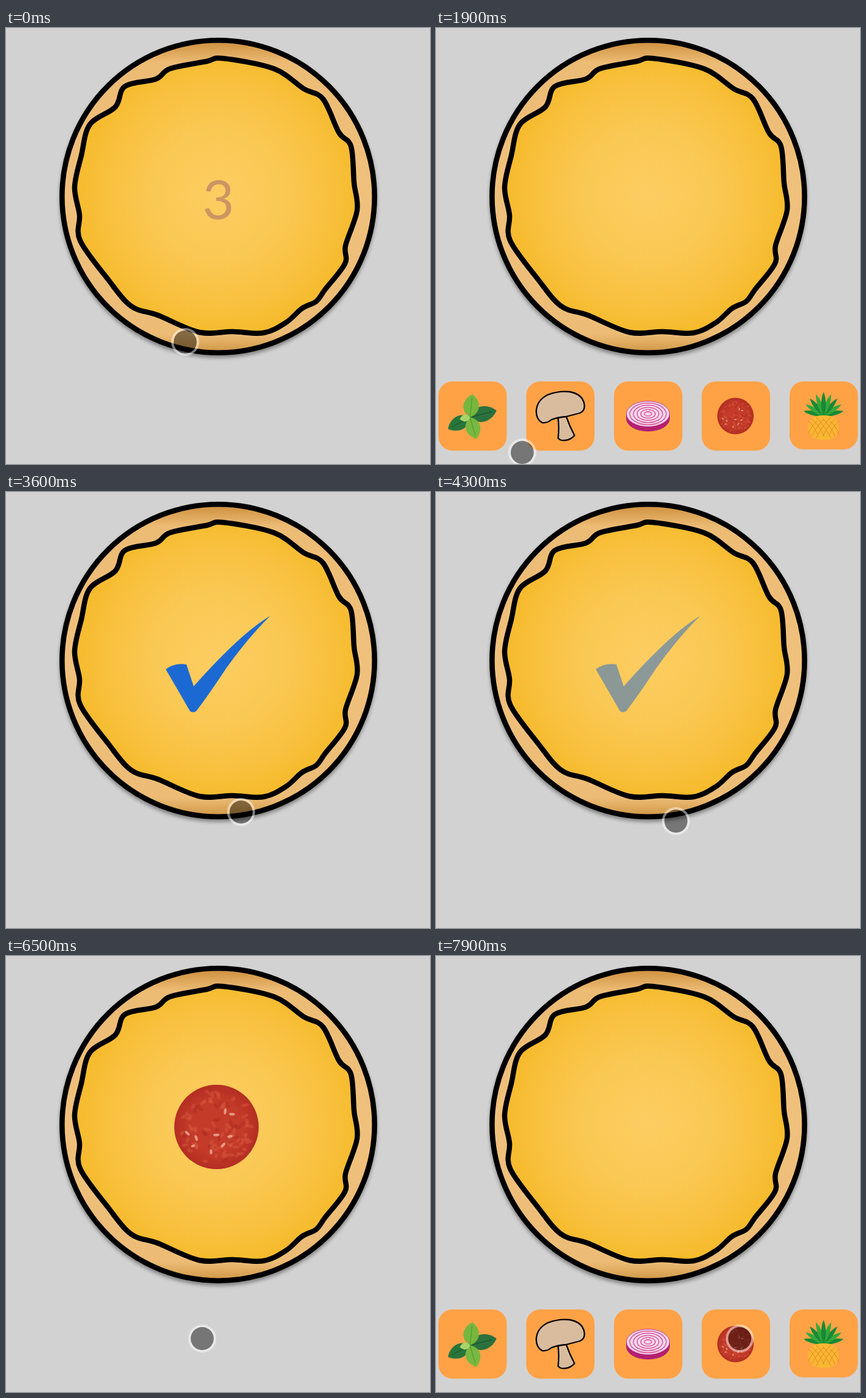
An HTML page for the animation above (8 s loop, 698x718 px).

```html
<!DOCTYPE html>
<html lang="en">
<head>
<meta charset="utf-8">
<title>Pizza memory game</title>
<style>
  html, body { margin: 0; width: 100%; height: 100%; overflow: hidden; background: #d2d2d2; }
  svg { display: block; width: 100%; height: 100%; }
  #count { font: 400 90px Lato, sans-serif; fill: #cc9563; text-anchor: middle; }
  .outline { stroke: #000; stroke-linejoin: round; stroke-linecap: round; }
</style>
</head>
<body>
<svg viewBox="0 0 698 718" xmlns="http://www.w3.org/2000/svg">
  <defs>
    <linearGradient id="dough" x2="0" y2="1">
      <stop offset="0" stop-color="#cc8d3a"/>
      <stop offset=".07" stop-color="#ecbb74"/>
      <stop offset=".5" stop-color="#f0c17d"/>
      <stop offset=".94" stop-color="#ecbc76"/>
      <stop offset="1" stop-color="#cf9645"/>
    </linearGradient>
    <radialGradient id="cheeseFill" gradientUnits="userSpaceOnUse" cx="349" cy="274" r="238">
      <stop offset="0" stop-color="#fdcd62"/>
      <stop offset=".45" stop-color="#fac853"/>
      <stop offset=".75" stop-color="#f8c140"/>
      <stop offset="1" stop-color="#f6ba2b"/>
    </radialGradient>
    <radialGradient id="meat">
      <stop offset=".6" stop-color="#c43b29"/>
      <stop offset="1" stop-color="#b42e22"/>
    </radialGradient>
    <filter id="soft" x="-10%" y="-10%" width="120%" height="120%">
      <feGaussianBlur stdDeviation="3"/>
    </filter>
    <g id="pepperoni">
      <circle r="69.5" fill="url(#meat)"/>
      <g id="flecks"></g>
    </g>
  </defs>

  <rect width="698" height="718" fill="#d2d2d2"/>

  <g id="pizza">
    <circle cx="349.5" cy="282" r="261" opacity=".4" filter="url(#soft)"/>
    <circle cx="349.5" cy="277.5" r="257.2" fill="url(#dough)" class="outline" stroke-width="8.6"/>
    <path id="cheese" fill="url(#cheeseFill)" class="outline" stroke-width="8.5"/>
  </g>

  <text id="count" x="349.5" y="314.5"></text>

  <use id="topping" href="#pepperoni"/>

  <path id="tick" fill="#1d69d3"
    d="M263 292 Q277 281 297 284 L309 320 Q386 233 435 204 Q399 239 362 291 Q333 335 313 361 Q308 364 303 361 Q284 328 263 292Z"/>

  <g id="menu">
    <g id="tiles" fill="#ffa246"></g>
    <g id="basil" transform="translate(56 641)"></g>

    <g id="mushroom" fill="#d8bc9d" class="outline" stroke-width="2.3">
      <path d="M201 642 Q203 660 201 675 Q204 680 213 679 Q222 678 228 671 Q220 656 214 639Z"/>
      <path d="M175 650 Q165 645 165 631 Q166 613 184 604 Q202 597 220 599 Q241 603 244 619 Q246 630 237 634 Q226 637 214 640 Q200 641 190 645 Q183 651 175 650Z"/>
    </g>

    <g id="onion">
      <path d="M313 635 V643 A36 21.5 0 0 0 385 643 V635Z" fill="#b32070"/>
      <ellipse cx="349" cy="635.5" rx="35.5" ry="21" fill="#f8d5ea" stroke="#c13a86"/>
      <g id="rings" fill="none" stroke="#cc4592" stroke-width="1.3"></g>
    </g>

    <use href="#pepperoni" transform="translate(493 639) scale(.432)"/>

    <g id="pineapple" transform="translate(638 638)">
      <g id="crown"></g>
      <rect x="-25" width="50" height="40" rx="20" fill="#fab632"/>
      <g id="hatch" fill="none" stroke="#e08c26"></g>
    </g>
  </g>

  <g id="cursor">
    <circle r="19" fill="#000" fill-opacity=".44"/>
    <circle r="21" fill="none" stroke="#fff" stroke-opacity=".48" stroke-width="4"/>
  </g>
</svg>

<script>
const LOOP = 8000, STEP = 100;
const $ = id => document.getElementById(id);

function add(parent, tag, attrs) {
  const el = document.createElementNS('http://www.w3.org/2000/svg', tag);
  for (const key in attrs) el.setAttribute(key, attrs[key]);
  $(parent).append(el);
}

// Closed Catmull-Rom curve through the points
function smoothLoop(points) {
  const n = points.length, at = i => points[(i + n) % n];
  const handle = (p, a, b) => [p[0] + (b[0] - a[0]) / 6, p[1] + (b[1] - a[1]) / 6];
  return points.reduce((d, p, i) => {
    const q = at(i + 1);
    return d + `C${handle(p, at(i - 1), q)} ${handle(q, at(i + 2), p)} ${q}`;
  }, 'M' + points[0]) + 'Z';
}

// Crests and hollows of the cheese edge
$('cheese').setAttribute('d', smoothLoop([
  [357, 50], [441, 67], [490, 100], [522, 117], [548, 172], [568, 195],
  [573, 255], [578, 300], [559, 358], [558, 388], [525, 431], [511, 450],
  [487, 462], [461, 485], [424, 502], [373, 500], [318, 501], [250, 473],
  [206, 458], [168, 414], [122, 350], [121, 308], [113, 262], [124, 210],
  [138, 159], [180, 130], [196, 96], [247, 84], [270, 67], [330, 55]
]));

let seed = 17;
const random = () => (seed = seed * 16807 % 2147483647) / 2147483647;

function fleck(spread, size, fill, opacity) {
  const angle = random() * 2 * Math.PI, dist = spread * Math.sqrt(random());
  add('flecks', 'ellipse', {
    rx: size * (1 + random()), ry: size * .8, fill, opacity,
    transform: `translate(${dist * Math.cos(angle)} ${dist * Math.sin(angle)}) rotate(${random() * 180})`
  });
}
for (let i = 0; i < 85; i++) fleck(60, 3.5, i % 4 ? '#dc6040' : '#a82920', .4);
for (let i = 0; i < 9; i++) fleck(54, 2.8, '#f2b5a2', .75);

for (let i = 0; i < 5; i++)
  add('tiles', 'rect', { x: 4 + i * 144.5, y: 582, width: 112.5, height: i < 4 ? 114 : 112, rx: 23 });

for (let k = 1; k < 6; k++)
  add('rings', 'ellipse', { cx: 349, cy: 635.5, rx: 36 - k * 6, ry: 21.5 - k * 3.6 });

// Leaf growing upwards from the parent's centre, turned by the angle
function leaf(parent, angle, length, width, fill, vein = 'none') {
  const transform = `rotate(${angle})`;
  add(parent, 'path', {
    d: `M0 0C${-width} ${-length * .3} ${-width * .6} ${-length * .8} 0 ${-length}C${width * .6} ${-length * .8} ${width} ${-length * .3} 0 0Z`,
    fill, transform
  });
  add(parent, 'path', { d: `M0 0V${-length * .85}`, stroke: vein, transform });
}
leaf('basil', -118, 41, 19, '#28753b', '#174f2a');
leaf('basil', 76, 45, 21, '#2b713c', '#174f2a');
leaf('basil', 6, 38, 21, '#76b63d', '#4d9234');
leaf('basil', 164, 37, 20, '#79b83f', '#4d9234');
leaf('basil', -100, 17, 9, '#a9d468');

for (let angle = 78; angle >= 0; angle -= 19.5)
  for (const side of [-1, 1])
    leaf('crown', side * angle, 38 - angle * .06, 6, angle % 39 ? '#35a83a' : '#168a35');

for (let k = -2; k <= 2; k++)
  for (const side of [-1, 1]) {
    const x = k * 9, reach = 17 - Math.abs(k) * 3, dx = side * reach * .7;
    add('hatch', 'path', { d: `M${x - dx} ${20 - reach}Q${x + side * 3} 18 ${x + dx} ${20 + reach}` });
  }

const HOME = [295, 517];
const moves = [
  { from: 900, to: 1200, end: [142, 699] },
  { from: 1900, to: 3000, end: [502, 650] },
  { from: 3200, to: 3400, end: [387, 527] },
  { from: 3600, to: 4200, end: [395, 542] },
  { from: 5600, to: 6300, end: [323, 630] },
  { from: 6900, to: 7900, end: [500, 630] }
];
// Time left before the drop, and what is shown from then on
const countdown = [[1000, '3'], [750, '2'], [625, '1'], [500, 'GO'], [0, '']];
const drops = [800, 5600], SHOWN = 1000, FALL = 180;

const clamp = k => Math.max(0, Math.min(1, k));
const smooth = k => k * k * (3 - 2 * k);
const show = (id, opacity) => $(id).setAttribute('opacity', Number(opacity));

const cursorAt = t => moves.reduce((pos, { from, to, end }) => {
  const k = smooth(clamp((t - from) / (to - from)));
  return pos.map((v, i) => v + (end[i] - v) * k);
}, HOME);

function draw(t) {
  const drop = drops.find(d => t < d + SHOWN) ?? Infinity;
  const label = countdown.findLast(([lead]) => drop - t <= lead);
  $('count').textContent = label ? label[1] : '';

  show('topping', t >= drop);
  const left = (1 - clamp((t - drop) / FALL)) ** 2;
  $('topping').setAttribute('transform',
    `translate(${346.5 + 3.5 * left} ${281.5 - 172 * left}) scale(${1 + .1 * left})`);

  show('menu', t >= 1800 && t < 3300 || t >= 6600);
  show('tick', t < 3400 ? 0 : clamp((4400 - t) / 200));
  $('cursor').setAttribute('transform', `translate(${cursorAt(t)})`);
}

const origin = performance.now();
function tick() {
  const t = (performance.now() - origin) % LOOP;
  draw(Math.floor(t / STEP) * STEP);
  requestAnimationFrame(tick);
}
tick();
</script>
</body>
</html>
```
